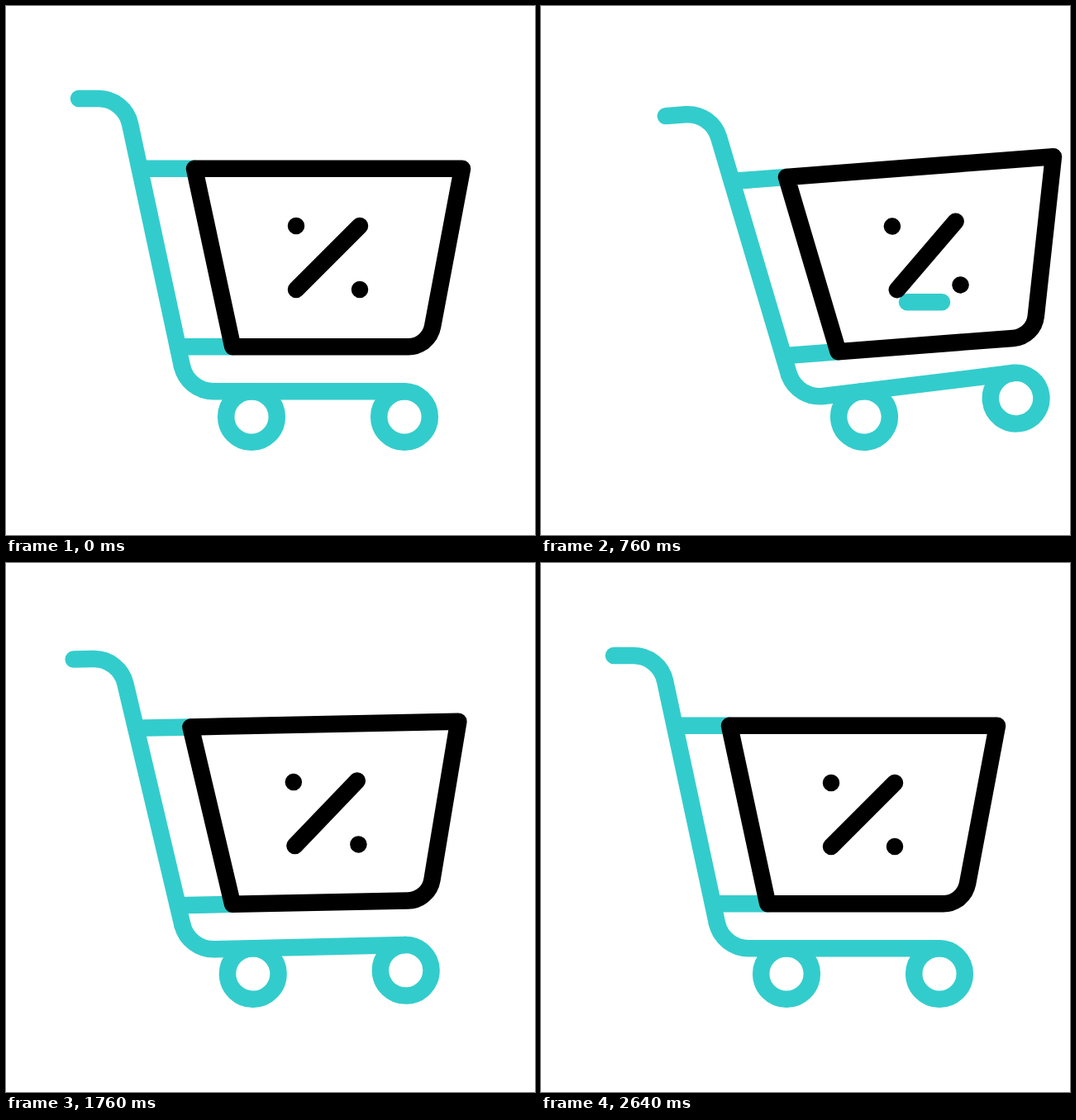
An HTML page for the animation above (2840 ms loop, 640 by 640 pixels).

```html
<!DOCTYPE html>
<html lang="en">
<head>
<meta charset="utf-8">
<title>Discount cart</title>
<style>
  html, body { margin: 0; width: 100%; height: 100%; overflow: hidden; background: #fff; }
  svg { display: block; width: 100%; height: 100%; }
  .line { fill: none; stroke-width: 20.5; stroke-linecap: round; stroke-linejoin: round; }
  .teal { stroke: #33cccc; }
  .ink { stroke: #000; }
</style>
</head>
<body>
<svg viewBox="0 0 640 640">
  <path id="dash" class="line teal"/>
  <g id="cart">
    <g class="line teal">
      <path d="M213 436A39 39 0 0 0 251 466.2H482"/>
      <circle cx="297" cy="497" r="30.8"/>
      <circle cx="482" cy="497" r="30.8"/>
    </g>
    <g id="upper" class="line">
      <g class="teal">
        <path d="M88 112H112A39 39 0 0 1 150.1 142.8L213 436"/>
        <path d="M162 196.8H228M208 412.2H274"/>
      </g>
      <g class="ink">
        <path d="M228 196.8H552L516.1 387.7A30 30 0 0 1 486.6 412.2H274.2Z"/>
        <path d="M351 343L428 266M351 266h.01M428 343h.01"/>
      </g>
    </g>
  </g>
</svg>
<script>
const LOOP = 2840, STEP = 40;
const $ = id => document.getElementById(id);
const cart = $('cart'), upper = $('upper'), dash = $('dash');

const part = (t, a, b) => Math.min(1, Math.max(0, (t - a) / (b - a)));

const smooth = (t, a, b) => {
  const p = part(t, a, b);
  return p * p * (3 - 2 * p);
};

// Cubic ease in and out; a higher delay pushes the change towards the end.
const late = (t, a, b, delay) => {
  const p = part(t, a, b) ** delay;
  return p < 0.5 ? 4 * p ** 3 : 1 - 4 * (1 - p) ** 3;
};

const hump = (t, a, b) => Math.sin(Math.PI * part(t, a, b));

const roll = t => 94 * (smooth(t, 40, 588) - late(t, 640, 1900, 1.557));

const lift = t => 11.8 * smooth(t, 40, 370)
  - 4.85 * smooth(t, 400, 740)
  - 6.95 * late(t, 1200, 1900, 2);

// The basket rocks and calms down, then rocks again as the cart lands.
function sway(t) {
  if (t < 1450) {
    const s = Math.max(0, t - 40);
    return 3.61 * Math.exp(-s / 2136) * Math.sin(Math.PI * s / 470);
  }
  return 0.6 * hump(t, 1450, 1756) - 1.9 * hump(t, 1756, 1985)
    + hump(t, 1985, 2175) - 0.8 * hump(t, 2175, 2640);
}

function dashPath(t) {
  const p = part(t, 640, 880);
  if (p === 0 || p === 1) return '';
  const mid = 530 - 132 * p, half = 21 * Math.sin(Math.PI * p);
  return `M${mid - half} 358.3H${mid + half}`;
}

function draw(t) {
  cart.setAttribute('transform', `translate(${roll(t)} 0) rotate(${-lift(t)} 297 497)`);
  upper.setAttribute('transform', `rotate(${-sway(t)} 213 437)`);
  dash.setAttribute('d', dashPath(t));
}

let start;
function tick(now) {
  start ??= now;
  const t = (now - start) % LOOP;
  draw(Math.floor(t / STEP) * STEP);
  requestAnimationFrame(tick);
}
draw(0);
requestAnimationFrame(tick);
</script>
</body>
</html>
```
